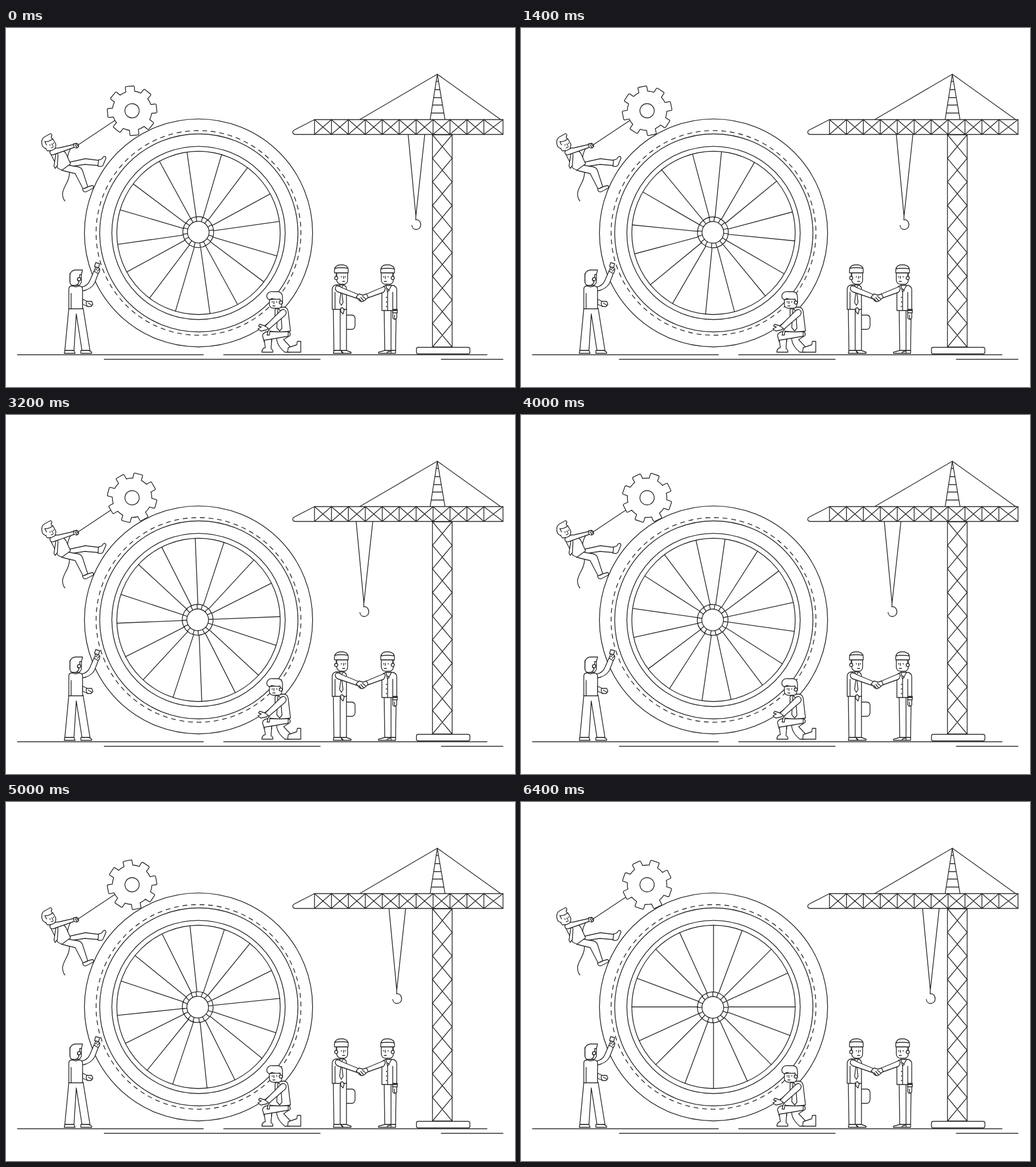
An HTML page for the animation above (6600 ms loop, 891 by 629 pixels).

```html
<!DOCTYPE html>
<html lang="en">
<head>
<meta charset="utf-8">
<title>Wheel works</title>
<style>
html, body { margin: 0; width: 100%; height: 100%; overflow: hidden; background: #fff; }
svg { display: block; width: 891px; height: 629px; }
svg * { stroke-linecap: round; stroke-linejoin: round; }
.scene { fill: #fff; stroke: #262626; stroke-width: 1.35; }
.line { fill: none; }
.dot { fill: #262626; stroke: none; }
</style>
</head>
<body>
<svg viewBox="0 0 891 629">
<g class="scene">
  <path class="line" d="M20 572.5H345.5M381 572.5H842M172 580.5H550M762 580.5H870"/>

  <g id="crane">
    <path d="M746.5 187H781V559H746.5Z"/>
    <path id="mast" class="line"/>
    <rect x="718.5" y="559.5" width="93.5" height="11.5" rx="3"/>
    <path class="line" d="M619 160.5L755 81L866 160.5"/>
    <path d="M742.5 160.5L755 81L768.5 160.5M753 93.500H757M751 108H759.500M748.700 122H762M746.600 135H764.300M744.300 149H766.600"/>
    <path d="M540 160.500H870V186.500H507Q502 186.500 502 182.500Q502 180 505 178.500Z"/>
    <path id="jib" class="line"/>
    <g id="hook" class="line">
      <path d="M-14 187L-.6 329V336M15 187L-.4 329M-1 336C4 335 8 339 8 345C8 350 4 353 0 353C-4 353 -7 350 -7.500 346"/>
    </g>
  </g>

  <g class="line">
    <circle cx="337" cy="359" r="199.700"/>
    <circle cx="337.500" cy="359" r="173.500"/>
    <circle cx="337" cy="359" r="151.700"/>
    <circle cx="337" cy="359" r="143"/>
    <g id="wheel">
      <circle r="179.300" pathLength="750" stroke-dasharray="5.600 4.400" style="stroke-linecap:butt"/>
      <path id="spokes"/>
    </g>
    <g id="hub"><circle r="27"/><circle r="19"/><path id="ticks"/></g>
  </g>

  <path class="line" d="M126 205L204 153"/>
  <g id="gear"><path id="teeth"/><circle r="12.500"/></g>

  <g id="climber">
    <path class="line" d="M114 210Q106 222 108 236M111 252C112 268 100 278 99 290Q99 298 103 303"/>
    <path d="M107 236L139 229L163 232L162 241L138 239L112 243Z"/>
    <path d="M162 231Q168 231 170 226Q174 223 175 228L170 240Q168 244 161 242Z"/>
    <path d="M97 249Q107 252 121 255L135 282L143 278L134 250Q132 244 125 243L107 240Z"/>
    <path d="M134 282Q140 281 144 278L151 276Q155 277 152 281L140 287Q135 288 134 282Z"/>
    <path d="M77 218Q79 212 86 212L97 210L105 220L113 238L98 249L91 246Z"/>
    <path d="M88 216L91 222L90 241L86 246L84 242Z"/>
    <path d="M77 216Q84 210 93 210L119 204L120 209L83 222Q76 223 77 216Z"/>
    <path d="M118 203L124 202Q128 204 127 208Q125 212 119 209ZM121 205L125 210M123 203L127 208"/>
    <path d="M68 209L72 215Q79 216 85 212Q88 208 87 203L82 194L68 199Z"/>
    <path d="M70 211Q64 210 63 204Q61 195 67 191L78 185Q82 187 79 191L81 195Q74 200 68 199L71 205"/>
    <circle class="dot" cx="77" cy="205" r="1"/><circle class="dot" cx="83" cy="202" r="1"/>
    <path class="line" d="M80 203L82 206M79 210L83 208"/>
  </g>

  <g id="inspector">
    <path d="M134 475L146 481L143 488L134 484Z"/>
    <path d="M141 479H150L152 484L149 488L143 488Q139 484 141 479ZM144 482L151 486"/>
    <path d="M110 491L103 565H119L123 501L133 565H147L135 491Z"/>
    <path d="M103 565H119L121 570H102ZM131 565H145Q151 567 150 570H131Z"/>
    <path d="M132 454Q143 452 147 442L154 426L162 429L155 447Q149 458 133 461Z"/>
    <path d="M154 426L157 419L160 418L164 422Q165 427 161 430ZM157 424L160 421M160 426L163 423"/>
    <path d="M157 411L164 413L162 420L155 418Z"/>
    <path d="M110 492V457Q110 452 116 452H128Q134 452 134 458V492ZM114 465V492"/>
    <path d="M117 445V452Q122 455 127 452V445"/>
    <path d="M112 430V445Q113 451 120 451H127Q132 449 132 443V430Z"/>
    <path d="M112 444V433Q113 425 121 424H134L132 432H129V438Q125 437 125 441Q126 444 128 444Q127 449 122 451H118Q112 451 112 444Z"/>
    <circle cx="128" cy="440" r="2.800"/>
  </g>

  <g id="kneeler">
    <path d="M474 539L494 532Q499 534 497 539L486 546L500 561L497 568H488Q476 558 474 547Z"/>
    <path d="M494 560L509 555L510 549H516V568H493Z"/>
    <path d="M494 532V540L465 545V550H452L449 539Q450 533 458 532Z"/>
    <path d="M452 547L465 545L464 562Q468 564 467 568H448Q448 561 454 560Z"/>
    <path d="M471 493Q477 489 487 489Q493 490 494 497L498 531Q480 534 459 531L471 512Z"/>
    <path d="M476 491L481 496L483 526L479 531L474 525Z"/>
    <path d="M486 493Q493 496 489 503L460 528L453 523L480 496Q483 493 486 493Z"/>
    <path d="M453 522L444 519L442 522L447 524L441 527L446 531L456 529L459 526Z"/>
    <path d="M459 530L457 538H461L462 531"/>
    <path d="M461 476V485Q462 491 469 491H478Q483 490 483 483V473Z"/>
    <path d="M461 476Q455 474 457 467Q460 461 467 462H475Q484 462 484 472V482L480 478V475Q471 476 465 474Z"/>
    <circle cx="481" cy="481" r="2.800"/>
    <circle class="dot" cx="466" cy="480" r="1"/><circle class="dot" cx="474" cy="480" r="1"/>
    <path class="line" d="M469 479V483M467 487H471"/>
  </g>

  <g id="visitor">
    <path d="M595 503H606Q611 504 611 509V522Q610 528 605 528H595Z"/>
    <path d="M573 492L574 565H596V492ZM585 494V565"/>
    <path d="M574 565H586L591 570H573ZM586 565H596L604 568V570H589Z"/>
    <path d="M571 493V457Q572 451 578 450H590Q596 452 596 457V493ZM576 463V493"/>
    <path d="M584 451L587 456L590 451M587 456L590 481L587 486L584 481Z"/>
    <path d="M586 491L589 490L592 494L590 501L586 497Z"/>
    <path d="M578 452Q583 451 588 455L617 467L615 474L580 462Q574 458 578 452Z"/>
    <path d="M579 429V443Q581 449 588 449H593Q598 447 598 441V429Z"/>
    <path d="M575 429V424Q576 415 586 415H590Q598 416 599 423V429ZM575 421Q587 419 599 421"/>
    <path d="M578 430V435"/>
    <circle cx="578" cy="438" r="2.800"/>
    <circle class="dot" cx="587" cy="436" r="1"/><circle class="dot" cx="594" cy="436" r="1"/>
    <path class="line" d="M591 435V439M589 444H593"/>
  </g>

  <g id="host">
    <path d="M662 493L663 565H682L683 493ZM674 495V565"/>
    <path d="M663 565H674V570H652Q651 567 656 567ZM675 565H682V570H667Q667 567 671 567Z"/>
    <path d="M677 497L684 497V508Q680 513 677 508ZM680 503V509"/>
    <path d="M658 495V458Q659 452 665 451H678Q684 453 684 459V495ZM677 463V499H685V493M677 494H685"/>
    <path class="line" d="M665 451L668 463L675 451M668 463V495M668 457L671 460"/>
    <circle class="dot" cx="666" cy="472" r="1"/><circle class="dot" cx="666" cy="480" r="1"/><circle class="dot" cx="666" cy="488" r="1"/>
    <path d="M662 453L631 466L633 473L661 463Q666 456 662 453Z"/>
    <path d="M657 429V442Q658 449 665 449H673Q678 447 678 441V429Z"/>
    <path d="M656 429V424Q657 415 666 415H671Q680 417 680 424V429ZM656 422Q668 420 680 422"/>
    <path d="M677 430V435"/>
    <circle cx="677" cy="438" r="2.800"/>
    <circle class="dot" cx="661" cy="436" r="1"/><circle class="dot" cx="669" cy="436" r="1"/>
    <path class="line" d="M664 435V439M662 444H666"/>
    <path d="M613 471L618 466L625 468L631 466L634 472L627 478Q623 481 619 478ZM618 474L622 479M621 472L626 478M624 470L630 475"/>
  </g>
</g>
</svg>
<script>
const $ = id => document.getElementById(id);
const setPath = (id, d) => $(id).setAttribute('d', d);
const polar = (r, deg) => {
  const a = deg * Math.PI / 180;
  return `${(r * Math.sin(a)).toFixed(2)} ${(-r * Math.cos(a)).toFixed(2)} `;
};
const repeat = (n, draw) => Array.from({ length: n }, (_, i) => draw(i)).join('');
const cross = (x1, y1, x2, y2) => `M${x1} ${y1}L${x2} ${y2}M${x2} ${y1}L${x1} ${y2}`;

setPath('mast', repeat(9, i => cross(746.5, 187 + i * 41.33, 781, 187 + (i + 1) * 41.33)));
setPath('jib', repeat(11, i => {
  const x = 540 + i * 29.65, end = i < 10 ? x + 29.65 : 870;
  return `M${x} 160.5V186.5` + cross(x, 160.5, end, 186.5);
}));

// Spokes come in unevenly spaced pairs.
const spokes = (inner, outer) => repeat(16, i => {
  const a = (i >> 1) * 45 + (i % 2) * 24.5;
  return 'M' + polar(inner, a) + 'L' + polar(outer, a);
});
setPath('spokes', spokes(27, 143));
setPath('ticks', spokes(19, 27));

setPath('teeth', repeat(8, i => {
  const a = i * 45;
  return (i ? 'L' : 'M') + polar(34.5, a - 13) + 'L' + polar(41.5, a - 11)
    + 'Q' + polar(43.8, a - 10.5) + polar(43.5, a - 8)
    + 'L' + polar(43.5, a + 8) + 'Q' + polar(43.8, a + 10.5) + polar(41.5, a + 11)
    + 'L' + polar(34.5, a + 13) + 'A34.5 34.5 0 0 1 ' + polar(34.5, a + 32);
}) + 'Z');

// Keys are [ms, value] pairs, joined by straight runs.
const wheelKeys = [[0, 36.9], [1400, 5.6], [2400, -15], [3200, -26.8], [4000, -36.9], [5000, -51], [6400, -69.5]];
const gearKeys = [[0, -5.5], [1400, 78.5], [2400, 151], [3200, 195], [4000, 244], [5000, 304], [6400, 379]];
const hookKeys = [[0, 718], [1200, 678.5], [1400, 671], [2400, 637.5], [3000, 620], [3200, 627],
  [3600, 642.5], [4000, 650], [4800, 678.5], [5000, 684.5], [6000, 706], [6400, 717]];

function valueAt(keys, t) {
  const i = Math.max(1, keys.findIndex(key => key[0] >= t));
  const [t0, a] = keys[i - 1], [t1, b] = keys[i];
  return a + (b - a) * (t - t0) / (t1 - t0);
}

const LOOP = 6600, STEP = 200;
const place = (id, x, y, turn = 0) => $(id).setAttribute('transform', `translate(${x} ${y}) rotate(${turn})`);

function draw(now) {
  const t = Math.floor(now % LOOP / STEP) * STEP;
  const turn = valueAt(wheelKeys, t);
  const wobble = (turn - 55) * Math.PI / 180;
  place('wheel', 337, 359, turn);
  place('hub', 337 + 1.5 * Math.sin(wobble), 359 - 1.5 * Math.cos(wobble), turn);
  place('gear', 220.7, 145, valueAt(gearKeys, t));
  place('hook', valueAt(hookKeys, t), 0);
}

const start = performance.now();
function tick() {
  draw(performance.now() - start);
  requestAnimationFrame(tick);
}
tick();
</script>
</body>
</html>
```
